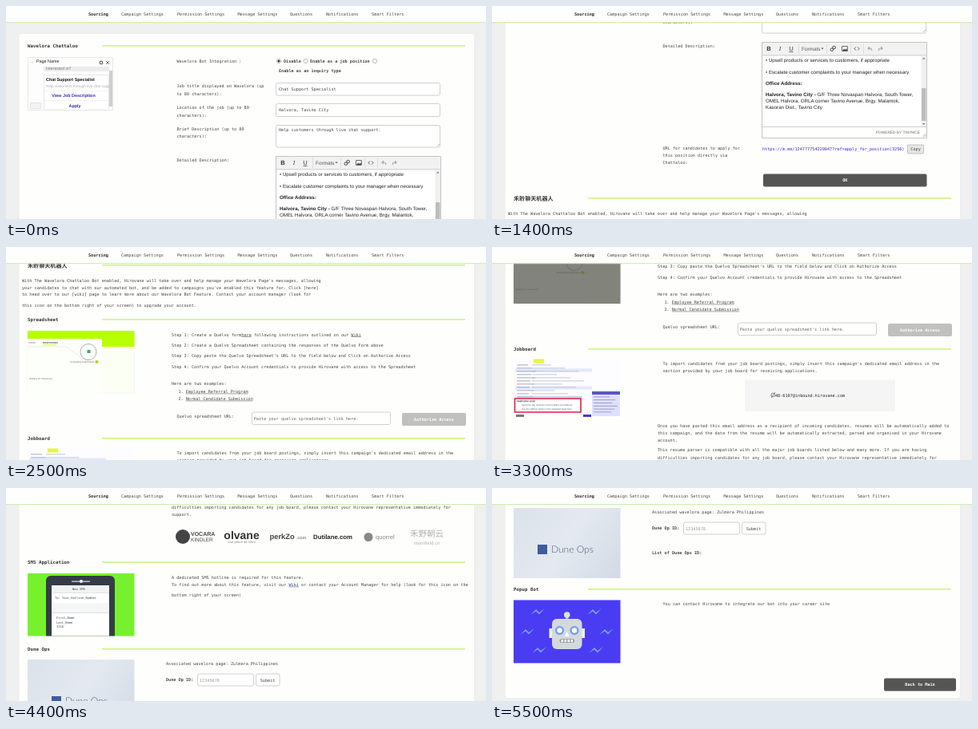
Recreate the animation shown at these times as an HTML page with a canvas. Size 600 px wide and 267 px high, loop 8.5 s.

```html
<!DOCTYPE html>
<html lang="en">
<head>
<meta charset="utf-8">
<title>Campaign settings</title>
<style>
  html, body { margin: 0; width: 100%; height: 100%; overflow: hidden; background: #f0f0f0; }
  canvas { display: block; }
</style>
</head>
<body>
<canvas id="stage" width="600" height="267"></canvas>
<script>
const ctx = document.getElementById('stage').getContext('2d');
const LOOP = 8500, STEP = 100;
const MONO = '"DejaVu Sans Mono", monospace';
const SANS = '"Liberation Sans", Arial, sans-serif';
const LATO = 'Lato, sans-serif';
const CJK = '"Noto Sans CJK SC", "Noto Sans CJK", sans-serif';
const LIME = '#b8ff00';

// [time, scroll position]; equal neighbours are pauses between wheel turns
const scrollKeys = [
  [400, 0], [900, 122], [1300, 122], [1400, 143], [1800, 256], [2100, 305],
  [2200, 305], [2500, 361], [2900, 452], [3200, 452], [3300, 473], [3900, 623],
  [4100, 623], [4400, 713], [4800, 815], [5200, 815], [5500, 903]
];

function scrollAt(t) {
  const i = scrollKeys.findIndex(key => key[0] >= t);
  if (i < 0) return 903;
  if (i === 0) return 0;
  const [t0, y0] = scrollKeys[i - 1], [t1, y1] = scrollKeys[i];
  return Math.round(y0 + (y1 - y0) * (t - t0) / (t1 - t0));
}

// y is the visual middle of the line
function text(str, x, y, { font = MONO, size = 5.18, weight = 'normal', color = '#444', align = 'left', underline } = {}) {
  ctx.font = `${weight} ${size}px ${font}`;
  ctx.textRendering = 'geometricPrecision';
  ctx.textAlign = align;
  ctx.fillStyle = color;
  ctx.fillText(str, x, y + size * 0.36);
  if (underline) ctx.fillRect(x, y + 2.7, ctx.measureText(str).width, 0.5);
}
const bold = (str, x, y, opt) => text(str, x, y, { weight: 'bold', ...opt });
const sans = (str, x, y, opt) => text(str, x, y, { font: SANS, size: 6.2, color: '#222', ...opt });
const lines = (x, rows) => rows.forEach(([y, str]) => text(str, x, y));

function rect(x, y, w, h, fill) {
  ctx.fillStyle = fill;
  ctx.fillRect(x, y, w, h);
}
function box(x, y, w, h, { fill = '#fff', stroke, r = 2, width = 0.8 } = {}) {
  ctx.beginPath();
  ctx.roundRect(x, y, w, h, r);
  if (fill) { ctx.fillStyle = fill; ctx.fill(); }
  if (stroke) { ctx.strokeStyle = stroke; ctx.lineWidth = width; ctx.stroke(); }
}
function circle(x, y, r, fill, stroke, width = 0.8) {
  ctx.beginPath();
  ctx.arc(x, y, r, 0, 7);
  if (fill) { ctx.fillStyle = fill; ctx.fill(); }
  if (stroke) { ctx.strokeStyle = stroke; ctx.lineWidth = width; ctx.stroke(); }
}
function path(points, stroke, width = 0.8, fill) {
  ctx.beginPath();
  points.forEach(([x, y]) => ctx.lineTo(x, y));
  if (fill) { ctx.fillStyle = fill; ctx.fill(); }
  if (stroke) { ctx.strokeStyle = stroke; ctx.lineWidth = width; ctx.stroke(); }
}
function heading(str, y, opt) {
  bold(str, 27, y, { color: '#333', size: 5.8, ...opt });
  rect(120, y - 0.8, 454, 1.4, '#c4f56c');
}
const field = (x, y, w, h) => box(x, y, w, h, { stroke: '#c4c4c4' });
function button(str, x, y, w, h, fill) {
  box(x, y, w, h, { fill });
  bold(str, x + w / 2, y + h / 2, { color: '#fff', align: 'center' });
}
function radio(x, y, on) {
  circle(x, y, 2.6, '#fff', '#999', 0.7);
  if (on) circle(x, y, 1.5, '#333');
}

function chatPreview() {
  box(27.5, 64.5, 106, 66, { fill: '#fdfdfd', stroke: '#e4e4e4', r: 0 });
  rect(31, 70, 3, 1, '#cdeb8a');
  sans('Page Name', 38, 69.5, { size: 5.4 });
  circle(119, 71, 1.8, null, '#666', 1.2);
  path([[125, 69], [129, 73]], '#555');
  path([[129, 69], [125, 73]], '#555');
  rect(47, 76, 82, 6, '#ececec');
  sans('Interested in?', 50, 78.5, { size: 5.2, color: '#777' });
  rect(129, 81, 4, 45, '#cfcfcf');
  box(47.5, 86.5, 81, 44, { stroke: '#e0e0e0', r: 1 });
  sans('Chat Support Specialist', 50, 92.5, { size: 5.4, weight: 'bold', color: '#111' });
  sans('Help customers through live chat supp', 50, 100, { size: 4.7, color: '#aaa' });
  rect(48, 106, 80, 0.5, '#e6e6e6');
  rect(48, 118, 80, 0.5, '#e6e6e6');
  sans('View Job Description', 84.5, 112, { size: 5.4, weight: 'bold', color: '#3232a8', align: 'center' });
  sans('Apply', 86, 125, { size: 5.4, weight: 'bold', color: '#3232a8', align: 'center' });
  box(30.5, 121.5, 13, 7, { fill: '#f4f4f4', stroke: '#ddd', r: 0 });
}

function editor() {
  box(337.5, 188.5, 206, 120, { stroke: '#b5b5b5', r: 0 });
  rect(338, 189, 205, 15.5, '#f2f2f2');
  rect(338, 204.5, 205, 0.8, '#bbb');
  const y = 196.5, icon = { size: 7.6, align: 'center', color: '#333' };
  sans('B', 346, y, { ...icon, weight: 'bold' });
  sans('I', 360, y, { ...icon, weight: 'italic', font: '"Liberation Serif", serif' });
  sans('U', 374, y, icon);
  rect(371.5, y + 3.5, 5, 0.7, '#333');
  sans('Formats', 387, y, { size: 6.4, color: '#555' });
  path([[411.5, 195.5], [414.5, 195.5], [413, 197.5]], null, 0, '#555');
  [383, 418, 448, 464].forEach(x => rect(x, 190, 0.6, 13, '#d2d2d2'));
  circle(424.8, 197.7, 1.8, null, '#444', 1);
  circle(427.6, 195, 1.8, null, '#444', 1);
  box(437.5, 193.5, 7, 6, { stroke: '#444', r: 0.5 });
  path([[438, 199], [440, 196.5], [441.5, 198], [443, 196], [444, 199]], null, 0, '#444');
  path([[454.8, 194.5], [453, 196.5], [454.8, 198.5]], '#333');
  path([[457.2, 194.5], [459, 196.5], [457.2, 198.5]], '#333');
  [[472, 1], [486, -1]].forEach(([x, d]) => {
    path([[x - 3 * d, 196], [x, 193.5], [x, 198.5]], null, 0, '#aaa');
    path([[x, 196], [x + 2 * d, 196.5], [x + 3 * d, 199]], '#aaa', 1.2);
  });

  sans('• Upsell products or services to customers, if appropriate', 342, 211);
  sans('• Escalate customer complaints to your manager when necessary', 342, 225.3);
  sans('Office Address:', 342, 239.7, { weight: 'bold' });
  const place = 'Halvora, Tavino City - ';
  sans(place, 342, 253.7, { weight: 'bold' });
  sans('G/F Three Novaspan Halvora, South Tower,', 342 + ctx.measureText(place).width, 253.7);
  sans('OMEL Halvora, ORLA corner Tavino Avenue, Brgy. Malantok,', 342, 261.7);
  sans('Kasoran Dist., Tavino City', 342, 270);

  rect(536.5, 205.3, 6.5, 89, '#f0f0f0');
  rect(537, 246, 5.5, 41, '#bdbdbd');
  path([[538, 209.5], [541.5, 209.5], [539.8, 207.5]], null, 0, '#777');
  path([[538, 290], [541.5, 290], [539.8, 292]], null, 0, '#777');
  rect(338, 294, 205, 0.8, '#c4c4c4');
  sans('POWERED BY TINYMCE', 535, 301.3, { size: 4.8, color: '#666', align: 'right' });
  path([[538.5, 307], [542.5, 303]], '#999');
  path([[540.5, 307], [542.5, 305]], '#999');
}

function messengerSection() {
  heading('Wavelora Chattaloo', 50);
  chatPreview();
  lines(213.5, [
    [69, 'Wavelora Bot Integration :'],
    [100, 'Job title displayed on Wavelora (up'], [110, 'to 80 characters):'],
    [127, 'Location of the job (up to 80'], [137, 'characters):'],
    [154, 'Brief Description (up to 80'], [163.5, 'characters):'],
    [193, 'Detailed Description:'],
    [321, 'URL for candidates to apply for'], [330.3, 'this position directly via'], [339.5, 'Chattaloo:']
  ]);
  radio(341, 69, true);
  bold('Disable', 347, 69);
  radio(374.5, 69);
  bold('Enable as a job position', 380, 69);
  radio(461, 69);
  bold('Enable as an inquiry type', 341, 81);
  field(337.5, 96.5, 205, 15.5);
  field(337.5, 122.5, 205, 16);
  field(337.5, 149.5, 205, 27.5);
  path([[539, 176], [542, 173]], '#aaa');
  lines(341, [
    [104, 'Chat Support Specialist'], [130.5, 'Halvora, Tavino City'],
    [155, 'Help customers through live chat support.']
  ]);
  editor();
  text('https://m.me/124777754220047?ref=apply_for_position(3256)', 338, 322.3, { color: '#4a12d8' });
  box(519.5, 317, 20, 11, { fill: '#e6e6e6', stroke: '#b4b4b4', r: 1 });
  text('Copy', 523.3, 322.5);
  button('OK', 339, 353.5, 204.5, 16, '#555');
}

function chatbotSection() {
  heading('禾聆聊天机器人', 384, { font: CJK, size: 7.1 });
  lines(20, [
    [403, "With The Wavelora Chattaloo Bot enabled, Hirovane will take over and help manage your Wavelora Page's messages, allowing"],
    [412, "your candidates to chat with our automated bot, and be added to campaigns you've enabled this feature for. Click [here]"],
    [420.5, 'to head over to our [wiki] page to learn more about our Wavelora Bot Feature. Contact your account manager (look for'],
    [434, 'this icon on the bottom right of your screen) to upgrade your account.']
  ]);
}

function spreadsheetSection(t) {
  heading('Spreadsheet', 452);
  box(27, 466, 133.5, 78, { fill: '#fcfff4', stroke: '#eee', r: 0, width: 0.5 });
  rect(27, 466, 133.5, 20, LIME);
  rect(27, 476, 93, 68, '#fdfffa');
  sans('FORM', 28, 481, { size: 3, color: '#777' });
  sans('RESPONSES', 46, 481, { size: 3, weight: 'bold', color: '#555' });
  rect(46, 483.5, 17, 0.8, LIME);
  path([[27, 486], [75, 486], [102, 505], [120, 505]], '#d5ddc8', 0.5);
  circle(103, 492.5, 10, '#fff', '#777', 0.6);
  rect(101.5, 490, 4, 4, '#3aa876');
  sans('Accepting responses', 80, 505, { size: 3.2, color: '#777' });
  circle(113.5, 505, 2, '#9be015');
  sans('Waiting for responses', 29, 525.5, { size: 3, color: '#777' });
  if (t >= 2800) rect(27, 466, 133.5, 78, 'rgba(88,88,82,.74)');

  lines(207, [
    [470.7, 'Step 1: Create a Quelvo form'],
    [484, 'Step 2: Create a Quelvo Spreadsheet containing the responses of the Quelvo Form above'],
    [497, "Step 3: Copy paste the Quelvo Spreadsheet's URL to the field below and Click on Authorize Access"],
    [510.7, 'Step 4: Confirm your Quelvo Account credentials to provide Hirovane with access to the Spreadsheet'],
    [532.3, 'Here are two examples:']
  ]);
  text('here', 294.3, 470.7, { underline: true });
  text('following instructions outlined on our', 309.9, 470.7);
  text('Wiki', 431.3, 470.7, { underline: true });
  text('1.', 215.5, 542);
  text('Employee Referral Program', 224.7, 542, { underline: true });
  text('2.', 215.5, 551);
  text('Normal Candidate Submission', 224.7, 551, { underline: true });
  text('Quelvo spreadsheet URL:', 213.5, 573);
  field(307.5, 568, 173, 15.5);
  text("Paste your quelvo spreadsheet's link here.", 309.7, 576, { color: '#666' });
  button('Authorize Access', 495, 569, 80, 16, '#c0c0c0');
}

function jobboardPreview() {
  box(27, 613, 133.5, 73, { fill: '#fdfdff', r: 0 });
  rect(52, 613.5, 13, 5, '#e8f53c');
  [[628, 96], [650, 96], [662, 84]].forEach(([y, w]) => rect(29, y - 2.5, w, 4, '#e3e9fa'));
  for (let i = 0; i < 11; i++) {
    const y = 620.5 + i * 4;
    rect(31, y, 14 + i * 5 % 11, 0.8, '#8d94b8');
    rect(50, y, 24 + i * 17 % 44, 0.8, '#b3b8d2');
  }
  rect(125, 654, 35, 31, '#dfe0fb');
  rect(125, 654, 35, 4, '#5b55c4');
  for (let i = 0; i < 6; i++) rect(127, 660.5 + i * 3.8, 20 + i * 7 % 11, 0.8, '#8f8ccb');
  box(28.5, 663, 82.5, 17, { fill: '#fff', stroke: '#e0203c', r: 0, width: 1.6 });
  sans('Application email', 31, 666, { size: 2.8, weight: 'bold' });
  sans('Send the new resumes to this mailbox and address', 37, 671, { size: 2.8, color: '#557' });
  sans('Use the address given on the campaign page here', 37, 675.5, { size: 2.8, color: '#557' });
  rect(30, 683, 10, 3, '#777');
  rect(114, 683, 10, 3, '#4a35d0');
}

function boardNames() {
  const dark = '#444', mid = '#888', light = '#b0b0b0';
  circle(221, 774, 9, dark);
  sans('VOCARA', 231, 770.5, { size: 7, weight: 'bold', color: dark });
  sans('KINDLER', 231, 777.5, { size: 6.4, color: dark });
  sans('olvane', 294.5, 772, { size: 14, weight: 'bold', color: '#333', align: 'center' });
  sans('one place all roles', 294.5, 780, { size: 4.3, color: mid, align: 'center' });
  sans('perkZo', 329.5, 774, { size: 9.4, weight: 'bold', color: dark });
  sans('.com', 363, 775.5, { size: 5.2, weight: 'bold', color: mid });
  sans('Dutilane.com', 408.5, 774.5, { size: 7.8, weight: 'bold', color: '#222', align: 'center' });
  circle(453, 774.5, 5.5, mid);
  sans('quorrel', 462, 774.5, { size: 7.6, color: mid });
  text('禾野朝云', 526, 770.5, { font: CJK, size: 10.5, color: light, align: 'center' });
  sans('mornfield.cn', 526, 782, { size: 6, color: light, align: 'center' });
}

function jobboardSection() {
  heading('Jobboard', 601);
  jobboardPreview();
  lines(213.5, [
    [619.3, "To import candidates from your job board postings, simply insert this campaign's dedicated email address in the"],
    [628.3, 'section provided by your job board for receiving applications.']
  ]);
  rect(316, 639.5, 188, 39.5, '#f5f5f5');
  circle(351.3, 658.5, 2.4, null, '#555', 0.7);
  path([[349, 662], [354, 655]], '#555', 0.7);
  text('48-6107@inbound.hirovane.com', 354, 659.3, { color: '#222' });
  lines(207, [
    [697, 'Once you have pasted this email address as a recipient of incoming candidates, resumes will be automatically added to'],
    [706.3, 'this campaign, and the data from the resume will be automatically extracted, parsed and organised in your Hirovane'],
    [715, 'account.'],
    [727.3, 'This resume parser is compatible with all the major job boards listed below and many more. If you are having'],
    [737, 'difficulties importing candidates for any job board, please contact your Hirovane representative immediately for'],
    [746, 'support.']
  ]);
  boardNames();
}

function smsSection() {
  heading('SMS Application', 806);
  rect(27, 820, 133.5, 78.5, '#77f12d');
  box(50, 823, 86, 75.5, { fill: '#343c48', r: [6, 6, 0, 0] });
  rect(82, 829.6, 23, 1, '#fff');
  circle(94, 830, 2, '#fff');
  rect(57, 835, 72, 63.5, '#fff');
  rect(57, 835, 72, 9.5, '#f1f2f4');
  rect(57, 857, 72, 12, '#f4f6f8');
  rect(57, 844.5, 72, 0.5, '#ccc');
  rect(57, 869, 72, 0.5, '#bbb');
  const small = { size: 3.75, color: '#444' };
  text('New SMS', 91, 839.5, { ...small, align: 'center' });
  text('To: Your_Hotline_Number', 61, 850.5, small);
  ['First_Name', 'Last_Name', '3216'].forEach((s, i) => text(s, 63, 876 + i * 5.5, small));
  lines(207, [
    [825, 'A dedicated SMS hotline is required for this feature.'],
    [834, 'To find out more about this feature, visit our'],
    [847, 'bottom right of your screen)']
  ]);
  text('Wiki', 353.5, 834, { underline: true, color: '#2b3f78' });
  text('or contact your Account Manager for help (look for this icon on the', 369.1, 834);
}

function adsSection() {
  heading('Dune Ops', 915);
  const sky = ctx.createLinearGradient(27, 928, 160, 1016);
  sky.addColorStop(0, '#dce2ea');
  sky.addColorStop(0.5, '#e4e9f0');
  sky.addColorStop(1, '#d3dae5');
  rect(27, 928, 133.5, 88, sky);
  rect(57, 974, 12, 12, '#3f5c9e');
  text('Dune Ops', 74, 980, { font: LATO, weight: 300, size: 12, color: '#4d5d78' });
  text('Associated wavelora page: Zulmera Philippines', 200, 933);
  bold('Dune Op ID:', 200, 953);
  field(239.5, 946, 70, 15);
  text('12345678', 242, 953.7, { color: '#999' });
  field(312.5, 946, 29.5, 15);
  text('Submit', 317.7, 953.7);
  bold('List of Dune Ops ID:', 200, 984);
}

function robot() {
  rect(27, 1043.5, 133.5, 79, '#4a3cf2');
  const bolts = [[57, 1058], [128, 1058], [44, 1083], [143, 1083], [59, 1106], [130, 1106]];
  bolts.forEach(([x, y]) => path(
    [[x - 9, y + 4], [x - 2, y - 3], [x + 2, y + 1], [x + 9, y - 4], [x + 2, y + 3.5], [x - 2, y - 0.5]],
    null, 0, '#7ba4fa'));
  rect(92, 1063, 3.5, 7, '#b5bcc4');
  circle(93.7, 1062, 3.8, '#dfe3e5');
  rect(71.5, 1079, 44.5, 12, '#eef1f2');
  box(75, 1067, 37.5, 38, { fill: '#d4d9dc', r: 6 });
  [84.5, 103].forEach(x => {
    circle(x, 1081.5, 5.5, '#6f9cf5');
    circle(x, 1081.5, 3.2, '#fff');
  });
  path([[93.7, 1083], [91, 1089], [96.5, 1089]], null, 0, '#fff');
  box(84.5, 1092, 18.5, 5, { fill: '#8e99a6', r: 2.5 });
  for (let x = 86.5; x < 102; x += 4) rect(x, 1092.8, 2.6, 3.4, '#fff');
}

function popupSection() {
  heading('Popup Bot', 1030);
  robot();
  text('You can contact Hirovane to integrate our bot into your career site', 213.5, 1048.5);
  button('Back to Main', 490, 1141.5, 90, 16, '#555');
}

function navigation() {
  rect(0, 0, 600, 20.5, '#fefffd');
  rect(0, 20.2, 600, 1, '#c3efa0');
  bold('Sourcing', 103, 10, { color: '#222' });
  [['Campaign Settings', 144], ['Permission Settings', 214], ['Message Settings', 289.5],
   ['Questions', 355], ['Notifications', 400], ['Smart Filters', 457]]
    .forEach(([label, x]) => text(label, x, 10));
}

function draw(now) {
  const t = Math.floor(now % LOOP / STEP) * STEP;
  rect(0, 0, 600, 267, '#f0f0f0');
  ctx.save();
  ctx.translate(0, -scrollAt(t));
  box(16, 34.5, 569.5, 1132, { fill: '#fefffd', stroke: '#e6e6e6', r: 3, width: 0.6 });
  messengerSection();
  chatbotSection();
  spreadsheetSection(t);
  jobboardSection();
  smsSection();
  adsSection();
  popupSection();
  ctx.restore();
  navigation();
}

const start = performance.now();
function frame() {
  draw(performance.now() - start);
  requestAnimationFrame(frame);
}
frame();
</script>
</body>
</html>
```
